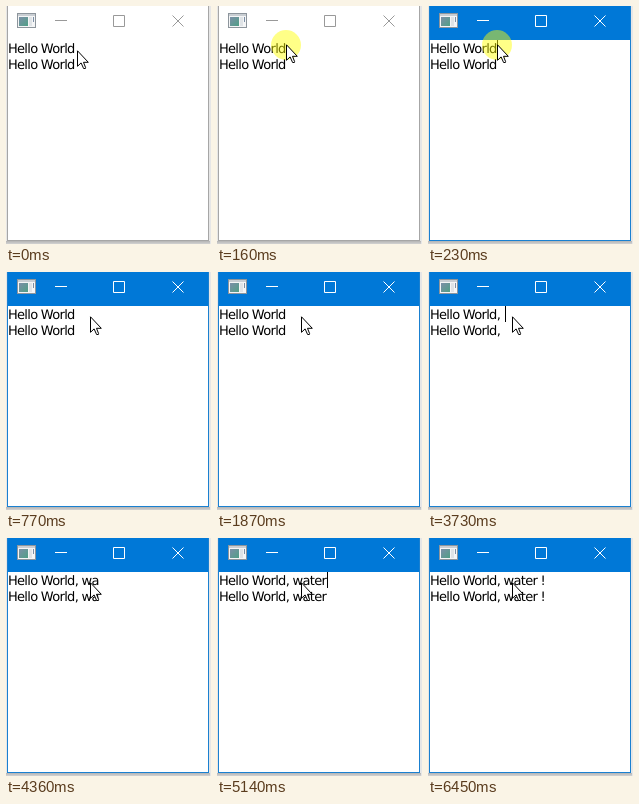
An HTML page for the animation above (6600 ms loop, 205 px wide and 238 px high).

```html
<!DOCTYPE html>
<html lang="en">
<head>
<meta charset="utf-8">
<title>Text field</title>
<style>
  html, body { margin: 0; width: 100%; height: 100%; overflow: hidden; background: #fff; }
  svg { display: block; width: 205px; height: 238px; }
  text {
    font: 13px "DejaVu Sans", sans-serif;
    letter-spacing: -0.69px;
    text-rendering: geometricPrecision;
    white-space: pre;
  }
</style>
</head>
<body>
<svg viewBox="0 0 205 238">
  <defs>
    <linearGradient id="shade" x2="0" y2="1">
      <stop offset="0" stop-color="#b4b4b4"/>
      <stop offset="1" stop-color="#d2d2d2"/>
    </linearGradient>
    <linearGradient id="pane" x2="1" y2="1">
      <stop offset="0" stop-color="#7d8fa8"/>
      <stop offset="1" stop-color="#4f9f86"/>
    </linearGradient>
  </defs>

  <!-- window and its shadow -->
  <rect width="205" height="238" fill="#e6e6e6"/>
  <rect y="235" width="204" height="3" fill="url(#shade)"/>
  <rect id="frame" x="1" width="202" height="235"/>
  <rect id="bar" x="2" width="200" height="34"/>
  <rect x="2" y="34" width="200" height="200" fill="#fff"/>

  <!-- title bar icon -->
  <g shape-rendering="crispEdges">
    <rect x="11" y="7" width="19" height="15" fill="#8d959c"/>
    <rect x="12" y="8" width="17" height="13" fill="#f4f5f6"/>
    <rect x="12" y="8" width="17" height="2" fill="#c9ced3"/>
    <rect x="13" y="11" width="9" height="9" fill="url(#pane)"/>
    <rect x="23" y="11" width="3" height="9" fill="#dfe3e6"/>
    <rect x="27" y="11" width="1" height="5" fill="#7b8ea5"/>
  </g>

  <!-- minimise, maximise, close -->
  <g id="buttons" fill="none">
    <path d="M49 14.5H61M107.5 9.5H118.5V20.5H107.5Z"/>
    <path d="M166.5 9.5L177.5 20.5M177.5 9.5L166.5 20.5"/>
  </g>

  <text class="line" x="1.9" y="47"></text>
  <text class="line" x="1.9" y="63"></text>
  <rect id="caret" y="34" width="1" height="16" shape-rendering="crispEdges"/>
  <circle id="click" cx="69" cy="39" r="15" fill="#ff0" fill-opacity=".47"/>
  <path id="pointer" d="M.5 .8V16.3L4.1 12.9L6.6 18.5H8.4L8.6 17.6L6.5 12.3H11.3Z"
        fill="#fff" stroke="#000"/>
</svg>

<script>
const LOOP = 6600;
const FOCUS = 230;
const $ = id => document.getElementById(id);
const lines = document.querySelectorAll(".line");

// [start ms, text, caret x]
const typing = [
  [0, "Hello World", 69],
  [2570, "Hello World,", 73],
  [2650, "Hello World, ", 77],
  [3810, "Hello World, wa", 94],
  [4660, "Hello World, wat", 98],
  [4970, "Hello World, wate", 105],
  [5140, "Hello World, water", 110],
  [5680, "Hello World, water ", 114],
  [5990, "Hello World, water !", 118]
];

// [start ms, x, y]
const moves = [
  [0, 71, 44], [80, 70, 40], [150, 69, 38],
  [540, 71, 39], [620, 75, 41], [700, 80, 43], [770, 84, 44]
];

// [start ms, caret shown]
const blinks = [
  [0, false], [FOCUS, true], [770, false], [1320, true], [1870, false],
  [2400, true], [3180, false], [3730, true], [4360, false], [4660, true],
  [5610, false], [5680, true], [6450, false]
];

const at = (steps, t) => steps.findLast(step => step[0] <= t);
const show = (el, on) => el.setAttribute("visibility", on ? "visible" : "hidden");

function draw(t) {
  const active = t >= FOCUS;
  $("frame").setAttribute("fill", active ? "#1a80d0" : "#a6a6a6");
  $("bar").setAttribute("fill", active ? "#0078d7" : "#fff");
  $("buttons").setAttribute("stroke", active ? "#fff" : "#999");

  const [, words, caretX] = at(typing, t);
  for (const line of lines) {
    if (line.textContent !== words) line.textContent = words;
  }
  $("caret").setAttribute("x", caretX);
  show($("caret"), at(blinks, t)[1]);
  show($("click"), t >= 150 && t < 390);

  const [, x, y] = at(moves, t);
  $("pointer").setAttribute("transform", `translate(${x} ${y})`);
}

const start = performance.now();
function tick() {
  draw((performance.now() - start) % LOOP);
  requestAnimationFrame(tick);
}
tick();
</script>
</body>
</html>
```
